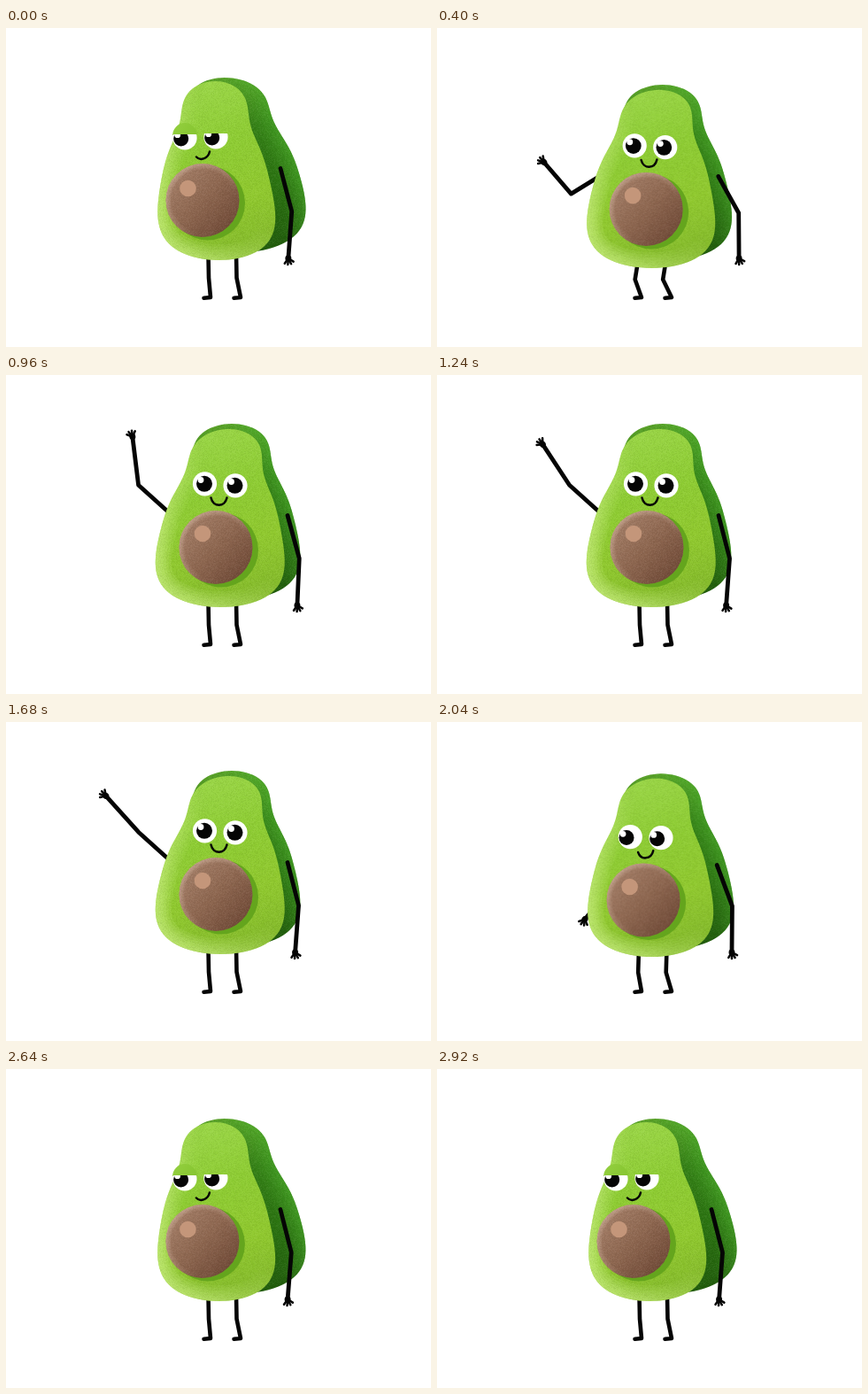
Animation, 480 px wide and 360 px high, one loop 2.96 s. Source, as an HTML page with a canvas:

```html
<!DOCTYPE html>
<html lang="en">
<head>
<meta charset="utf-8">
<title>Waving avocado</title>
<style>
html, body { margin: 0; width: 100%; height: 100%; overflow: hidden; background: #fff; }
canvas { display: block; width: 480px; height: 360px; }
</style>
</head>
<body>
<canvas id="stage" width="480" height="360"></canvas>
<script>
const ctx = document.getElementById('stage').getContext('2d');
const LOOP = 2960, STEP = 40, INK = '#050505', TAU = Math.PI * 2;

const mix = (a, b, k) => a + (b - a) * k;
const ease = (t, from, to) => {
  const u = Math.min(1, Math.max(0, (t - from) / (to - from)));
  return u * u * (3 - 2 * u);
};
const pulse = (t, mid, width) => Math.exp(-(((t - mid) / width) ** 2));
// Point at a distance, with the angle in degrees counted from upright to the left
const reach = ([x, y], deg, len) => {
  const a = deg * TAU / 360;
  return [x - len * Math.sin(a), y - len * Math.cos(a)];
};

// Pear outline: wide below, narrow neck, spine bent by lean and bow
function pear(top, bottom, mid, lean, bow, scale) {
  const path = new Path2D(), cy = (top + bottom) / 2, r = (bottom - top) / 2;
  for (let i = 0; i < 120; i++) {
    const a = i / 120 * TAU, c = Math.cos(a);
    const half = 65 - 22 * c + 33 * c * c - 11 * pulse(c, .55, .3);
    path.lineTo(mid + lean * c + bow * c * c + scale * half * Math.sin(a), cy - r * c);
  }
  path.closePath();
  return path;
}

function oval(x, y, rx, ry = rx) {
  const path = new Path2D();
  path.ellipse(x, y, rx, ry, 0, 0, TAU);
  return path;
}

function fill(path, style) {
  ctx.fillStyle = style;
  ctx.fill(path);
}

function line(pts, width) {
  ctx.strokeStyle = INK;
  ctx.lineWidth = width;
  ctx.beginPath();
  pts.forEach(p => ctx.lineTo(...p));
  ctx.stroke();
}

function ramp(x0, y0, x1, y1, ...stops) {
  const g = ctx.createLinearGradient(x0, y0, x1, y1);
  stops.forEach((c, i) => g.addColorStop(i / (stops.length - 1), c));
  return g;
}

// Soft light just inside an outline
function rim(path, style, size) {
  ctx.save();
  ctx.clip(path);
  ctx.strokeStyle = style;
  for (let i = 1; i <= 6; i++) {
    ctx.lineWidth = size * i / 6;
    ctx.stroke(path);
  }
  ctx.restore();
}

function makeGrain() {
  const tile = document.createElement('canvas');
  tile.width = tile.height = 160;
  const c = tile.getContext('2d'), img = c.createImageData(160, 160);
  let seed = 7;
  for (let i = 0; i < img.data.length; i += 4) {
    seed = (seed * 16807) % 2147483647;
    const n = seed / 2147483647 - .5;
    img.data.fill(n > 0 ? 255 : 0, i, i + 3);
    img.data[i + 3] = Math.abs(n) * 28;
  }
  c.putImageData(img, 0, 0);
  return ctx.createPattern(tile, 'repeat');
}
const grain = makeGrain();

function arm(shoulder, elbow, hand) {
  const dir = Math.atan2(hand[1] - elbow[1], hand[0] - elbow[0]);
  line([shoulder, elbow, hand], 4.8);
  ctx.save();
  ctx.translate(...hand);
  ctx.rotate(dir);
  fill(oval(-1, 0, 3.5), INK);
  for (let a = -1.2; a < .9; a += .6) line([[-1, 0], [6 * Math.cos(a), 6.5 * Math.sin(a)]], 2.5);
  ctx.restore();
}

function leg(hip, ankle, drop) {
  const bend = Math.max(0, drop);
  line([[hip - bend * .2, 256 + drop], [hip + .5 - bend * .6, 282 + bend * .2],
    [ankle, 304], [ankle - 7.5, 304.8]], 4.6);
}

function eye(x, y, look, lid, bulge) {
  const cut = y - 16 + 12 * lid;
  if (bulge && lid > 0) {
    ctx.save();
    ctx.beginPath();
    ctx.rect(x - 20, y - 20, 40, cut - y + 21);
    ctx.clip();
    ctx.globalAlpha = lid;
    fill(oval(x, y - 2, 14, 15), ramp(x - 14, y - 17, x + 14, y, '#94d040', '#85c42f'));
    ctx.restore();
  }
  ctx.save();
  ctx.beginPath();
  ctx.rect(x - 20, cut, 40, 40);
  ctx.clip();
  fill(oval(x, y, 13.6), '#fff');
  const px = x - .5 - 3.8 * look, py = y + look;
  fill(oval(px, py, 9 - .5 * look), INK);
  fill(oval(px - 4, py - 4.3, 3.4), '#fff');
  ctx.restore();
}

function drawSeed(x, y) {
  fill(oval(x + 6, y + 3, 42), '#64a51d');
  const nut = oval(x, y, 41.5);
  fill(nut, ramp(x - 32, y - 30, x + 32, y + 32, '#a47e67', '#8d664f', '#704a37'));
  rim(nut, ramp(x - 30, y - 30, x + 15, y + 15, 'rgba(215,185,165,.12)', 'rgba(215,185,165,0)'), 12);
  fill(nut, grain);
}

function draw(t) {
  const turn = 1 - ease(t, 140, 450) + ease(t, 1930, 2230);
  const drop = 10.5 * pulse(t, 360, 100) - 1.5 * pulse(t, 540, 70) + 5 * pulse(t, 1980, 85);
  const lid = 1 - ease(t, 150, 300) + ease(t, 2100, 2240);
  const arc = turn * (1 - turn);
  const settle = pulse(t, 2320, 200);
  const shift = 4 * arc - 1.2 * settle;
  const f = (front, side) => mix(front, side, turn);

  ctx.fillStyle = '#fff';
  ctx.fillRect(0, 0, 480, 360);
  ctx.lineCap = ctx.lineJoin = 'round';

  leg(228.5, 231, drop);
  leg(260, 265, drop);

  // Waving arm: the forearm leads the upper arm and swings from the elbow
  const raise = ease(t, 240, 560) - ease(t, 1700, 2080);
  const lift = ease(t, 200, 480) - ease(t, 1760, 2200);
  const swing = 22 + 20 * Math.cos(TAU * (t - 640) / 520);
  const shoulder = [186, 157 + drop];
  const elbow = reach(shoulder, mix(195, 48, raise), mix(32, 49, raise));
  arm(shoulder, elbow, reach(elbow, mix(195, swing, lift), mix(40, 56, raise)));

  ctx.save();
  ctx.translate(shift, drop);
  const back = pear(f(55, 56), 254, f(254, 257), f(0, -5), f(1, -5), f(1.07, 1.1));
  const face = pear(f(61, 60), 262, f(243, 236.3), f(4.5, -2), f(4, 2), f(1, .91));
  fill(back, ramp(225, 55, 285, 255, '#5ba428', '#327d14', '#2a7210', '#215c0c'));
  rim(back, ramp(290, 180, 340, 160, 'rgba(85,190,50,0)', 'rgba(85,190,50,.12)'), 50);
  fill(back, grain);
  fill(face, ramp(205, 70, 265, 262, '#9ad646', '#8ecd33', '#90c92e', '#83b92a'));
  rim(face, ramp(168, 200, 260, 150, 'rgba(210,245,140,.15)', 'rgba(210,245,140,0)'), 36);
  fill(face, grain);

  // Features dip along an arc while turning
  ctx.translate(0, 16 * arc);
  drawSeed(f(237, 222), 194.5);
  fill(oval(f(222, 205.5), f(179, 181), 9.3), '#c4967a');

  const look = Math.min(1, turn / .3);
  eye(f(224.5, 202), f(122.8, 124), look, lid, true);
  eye(f(259, 237), f(124.8, 123), look, lid, false);

  ctx.strokeStyle = INK;
  ctx.lineWidth = 2.5;
  ctx.beginPath();
  ctx.moveTo(f(231.5, 215), f(138.5, 145.5));
  ctx.bezierCurveTo(f(234, 219), f(149.5, 150), f(247, 228), f(149.5, 148), f(249.5, 230), f(138.5, 139.5));
  ctx.stroke();
  ctx.restore();

  // Resting arm swings out with the hop, the forearm trailing
  const counter = pulse(t, 2030, 120);
  const sx = f(318, 310) + shift;
  const ex = sx + 12.5 + 13 * pulse(t, 520, 260) + 5 * counter - 2 * settle;
  const hx = ex - 4 + 9 * pulse(t, 620, 260) + 4 * counter - 3 * settle;
  arm([sx, 158.5 + drop], [ex, 207 + drop * .2], [hx, 261]);
}

let start;
function tick(now) {
  start ??= now;
  draw(Math.floor(((now - start) % LOOP) / STEP) * STEP);
  requestAnimationFrame(tick);
}
requestAnimationFrame(tick);
</script>
</body>
</html>
```
